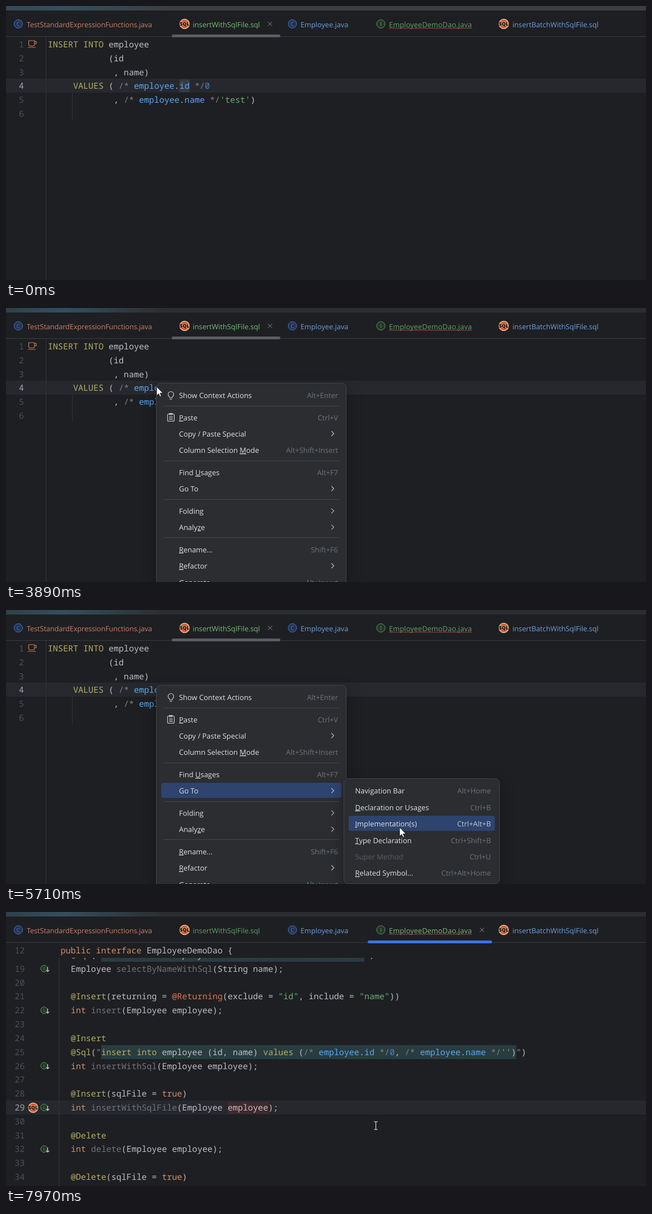
Recreate the animation shown at these times as an HTML page. Size 1143 by 490 pixels, loop 8000 ms.

```html
<!DOCTYPE html>
<html lang="en">
<head>
<meta charset="utf-8">
<title>Go to implementation from SQL</title>
<style>
  html, body { margin: 0; width: 100%; height: 100%; overflow: hidden; background: #1e1f22; }
  svg { display: block; }
  text { white-space: pre; text-rendering: geometricPrecision; }
  .code { font: 15.07px "Noto Sans Mono", "DejaVu Sans Mono", monospace; fill: #bcbec4; }
  .ui { font: 12.92px "Open Sans", "Noto Sans", sans-serif; fill: #dfe1e5; }
  .tab { font-size: 12.75px; }
  .u { text-decoration: underline; }
  .float { filter: drop-shadow(0 10px 13px rgba(0, 0, 0, .3)); }
  .line { fill: none; stroke-linecap: round; stroke-linejoin: round; }
</style>
</head>
<body>
<script>
const LOOP = 8000, CH = 9.04, ROW = 24.83;
const TONE = {
  k: '#b3ae60', c: '#7a7e85', b: '#56a8f5', n: '#4a82c4', s: '#6aab73',
  o: '#cf8e6d', g: '#6f737a', r: '#dc7350'
};

function el(tag, attrs, parent, text) {
  const node = document.createElementNS('http://www.w3.org/2000/svg', tag);
  for (const key in attrs) node.setAttribute(key, attrs[key]);
  if (text !== undefined) node.textContent = text;
  parent.append(node);
  return node;
}
const group = (parent, attrs = {}) => el('g', attrs, parent);
const rect = (parent, x, y, width, height, fill, rx = 0, more = {}) =>
  el('rect', { x, y, width, height, fill, rx, ...more }, parent);
const path = (parent, d, stroke, width = 1, more = {}) =>
  el('path', { d, stroke, 'stroke-width': width, class: 'line', ...more }, parent);
const label = (parent, x, y, text, attrs = {}) =>
  el('text', { x, y, class: 'ui', ...attrs }, parent, text);
const show = (node, on) => node.setAttribute('visibility', on ? 'visible' : 'hidden');

// Code markup: «k word» paints a word in tone k.
function code(parent, x, y, markup) {
  const line = el('text', { x, y: y + 5, class: 'code' }, parent);
  for (const [plain, tone, word] of markup.matchAll(/«(\w) ([^»]*)»|[^«]+/g))
    el('tspan', tone ? { fill: TONE[tone] } : {}, line, tone ? word : plain);
}
function lineNo(parent, x, y, n, current) {
  el('text', { x, y: y + 5, class: 'code', 'text-anchor': 'end',
    style: `fill:${current ? '#a1a3ab' : '#4b5059'}` }, parent, n);
}

function letterIcon(parent, x, y, letter, r = 7.5) {
  const [stroke, fill] = letter === 'C' ? ['#3f78d8', '#25324d'] : ['#57965c', '#253627'];
  el('circle', { cx: x, cy: y, r, fill, stroke }, parent);
  label(parent, x, y + r * .5, letter,
    { 'text-anchor': 'middle', style: `font-size:${r * 1.4}px;fill:${stroke}` });
}
function sqlIcon(parent, x, y) {
  el('circle', { cx: x, cy: y, r: 9.2, fill: '#e3b48c' }, parent);
  el('circle', { cx: x, cy: y, r: 7.4, fill: '#d0593a' }, parent);
  rect(parent, x - 8.5, y - 4, 17, 7.5, '#d98a60', 2);
  label(parent, x, y + 3, 'SQL',
    { 'text-anchor': 'middle', style: 'font-size:8.6px;font-weight:800;fill:#1c1210' });
}
function implIcon(parent, x, y) {
  letterIcon(parent, x - .5, y - .5, 'I', 6);
  path(parent, `M${x + 6} ${y - 3}v8m-2.5 -2.5l2.5 2.5l2.5 -2.5`, '#ced0d6', 1.1);
}
const cross = (parent, x) =>
  path(parent, `M${x - 3.5} 28.5l7 7m0 -7l-7 7`, '#8a8d94');
const chevron = (parent, x, y) =>
  path(parent, `M${x - 2} ${y - 4}l4 4l-4 4`, '#b4b8bf', 1.2);
const panel = (parent, x, y, w, h) =>
  rect(parent, x, y, w, h, '#2b2d30', 8, { stroke: '#43454a', class: 'float' });

const svg = el('svg', { width: 1143, height: 490, viewBox: '0 0 1143 490' }, document.body);
rect(svg, 0, 0, 1143, 490, '#1e1f22');

// Title strip
const strip = rect(svg, 0, 0, 1143, 8, '#3c3f41');
const fade = el('linearGradient', { id: 'teal' }, el('defs', {}, svg));
for (const [offset, opacity] of [[0, .55], [.36, 1], [1, 0]])
  el('stop', { offset, 'stop-color': '#32505e', 'stop-opacity': opacity }, fade);
rect(svg, 0, 0, 285, 8, 'url(#teal)');

// SQL file
const sqlView = group(svg);
const SQL = [
  '«k INSERT INTO» employee',
  '            (id',
  '             , name)',
  '     «k VALUES» ( «c /*» «b employee».«b id» «c */»«n 0»',
  '             , «c /*» «b employee».«b name» «c */»«s \'test\'»)',
  ''
];
rect(sqlView, 0, 130, 1143, 25, '#26282e');
rect(sqlView, 71, 55, 1, 435, '#313438');
rect(sqlView, 118, 155, 1, 49, '#313438');
const idMark = rect(sqlView, 309.5, 131.5, 18.5, 23, '#373b3d');
SQL.forEach((text, i) => {
  const y = 69 + i * ROW;
  code(sqlView, 74.8, y, text);
  lineNo(sqlView, 32, y, i + 1, i === 3);
});
path(sqlView, 'M40.5 62h10.500v6q0 3.500 -3.500 3.500h-3.500q-3.500 0 -3.500 -3.500zM51 63.500h3v4h-3M39.500 74h13',
  '#c4805f', 1.2);
const caret = rect(sqlView, 273, 132.5, 2, 21, '#ced0d6');

// DAO file
const daoView = group(svg);
const DAO = [
  '«k @Sql»("«k select» * «k from» employee «k where» name = «c /*» «b name» «c */»«s \'test\'»")',
  'Employee «g selectByNameWithSql»(String name);',
  '',
  '«k @Insert»(returning = «r @Returning»(exclude = «s "id"», include = «s "name"»))',
  '«o int» «g insert»(Employee employee);',
  '',
  '«k @Insert»',
  '«k @Sql»(«s "»«k insert into» employee (id, name) «k values» («c /*» «b employee».«b id» «c */»«n 0», «c /*» «b employee».«b name» «c */»«s \'\'»)«s "»)',
  '«o int» «g insertWithSql»(Employee employee);',
  '',
  '«k @Insert»(sqlFile = «o true»)',
  '«o int» «g insertWithSqlFile»(Employee employee);',
  '',
  '«k @Delete»',
  '«o int» «g delete»(Employee employee);',
  '',
  '«k @Delete»(sqlFile = «o true»)'
];
const daoY = n => 101.7 + (n - 19) * ROW;
rect(daoView, 0, 337, 1143, 25, '#26282e');
rect(daoView, 94, 82, 1, 408, '#313438');
rect(daoView, 170, 65, 52 * CH, 24, '#293c40');
rect(daoView, 170, 238, 82 * CH, 25, '#293c40');
const paramMark = rect(daoView, 396, 339, 73, 22, '#40292d');
DAO.forEach((text, i) => {
  const n = 18 + i, y = daoY(n);
  code(daoView, 115.7, y, text);
  lineNo(daoView, 33.5, y, n, n === 29);
});
for (const n of [19, 22, 26, 29, 32]) implIcon(daoView, 68.5, daoY(n));
sqlIcon(daoView, 48.5, daoY(29));
rect(daoView, 0, 55, 1143, 27, '#1e1f22');
lineNo(daoView, 33.5, 69, 12);
code(daoView, 97.5, 69, '«o public interface» EmployeeDemoDao {');

// Tabs
rect(svg, 0, 54, 1143, 1, '#393b40');
const TABS = [
  [22, 37, 'C', 'TestStandardExpressionFunctions.java', '#c77d6b', -.1],
  [319, 333.5, 'SQL', 'insertWithSqlFile.sql', '#73bd79', 0],
  [511.5, 526, 'C', 'Employee.java', '#6b9fe2', 0],
  [669.5, 684, 'I', 'EmployeeDemoDao.java', '#62a069', .12],
  [889, 904.5, 'SQL', 'insertBatchWithSqlFile.sql', '#6b9fe2', 0]
];
const tabText = TABS.map(([ix, x, icon, name, fill, gap]) => {
  icon === 'SQL' ? sqlIcon(svg, ix, 32) : letterIcon(svg, ix, 32, icon);
  return label(svg, x, 37.5, name, { class: 'ui tab', style: `fill:${fill};letter-spacing:${gap}px` });
});
path(svg, 'M684 40.500' + 'l2 -1.500l2 1.500'.repeat(37), '#b8524f', .9);
const sqlTab = group(svg), daoTab = group(svg);
cross(sqlTab, 471.5);
const sqlBar = rect(sqlTab, 296, 51, 194, 5, '#5a5d63', 2.5);
cross(daoTab, 850);
rect(daoTab, 646, 51, 222, 5, '#3574f0', 2.5);

// Quick documentation
const doc = group(svg);
panel(doc, 229, 155, 353.5, 85);
code(doc, 251, 182, '«b Employee» employee');
label(doc, 276.5, 218.5, 'doma-tools-test-single-pj.main', { style: 'font-size:13.25px' });
path(doc, 'M260 220h-5.500q-2 0 -2 -2v-9q0 -2 2 -2h4l2.500 2.500h5q2 0 2 2v2', '#ced0d6', 1.1);
rect(doc, 262, 215, 6.5, 6.5, '#25324d', 1.5, { stroke: '#548af7', 'stroke-width': 1.2 });
path(doc, 'M526 219l.8 -3.800l8.500 -8.500q1 -1 2 0l1.200 1.200q1 1 0 2l-8.500 8.500zM533.500 208.500l3.200 3.200', '#ced0d6', 1.1);
for (const cy of [207.5, 213, 218.5]) el('circle', { cx: 562, cy, r: 1.3, fill: '#ced0d6' }, doc);

// Menus: rows are [centre, caption with & before the mnemonic, shortcut or >, disabled]
function makeMenu(box, hot, textX, rightX, rows) {
  const g = group(svg);
  panel(g, ...box);
  const bar = rect(g, hot[0], 0, hot[1] - hot[0], 27, '#2e436e', 4);
  const keys = rows.map(([y, caption, key, off]) => {
    const [head, tail] = caption.split('&');
    const t = label(g, textX, y + 4.5, head, off ? { style: 'fill:#5a5d63' } : {});
    if (tail) {
      el('tspan', { class: 'u' }, t, tail[0]);
      el('tspan', {}, t, tail.slice(1));
    }
    if (key === '>') return chevron(g, 583.5, y - .5);
    return label(g, rightX, y + 4.5, key, { 'text-anchor': 'end', style: 'fill:#6f737a' });
  });
  const hit = (x, y) => x < hot[0] || x > hot[1] ? -1
    : rows.findIndex(r => !r[3] && Math.abs(r[0] - y) < 14);
  const select = i => {
    show(bar, i >= 0 && g.getAttribute('visibility') === 'visible');
    if (i >= 0) bar.setAttribute('y', Math.round(rows[i][0] - 14.5));
    keys.forEach((k, j) => { if (k.tagName === 'text') k.style.fill = i === j ? '#c3cadb' : '#6f737a'; });
  };
  return { g, hit, select };
}
const GO_TO = 5;
const menu = makeMenu([268.5, 134.5, 339, 380], [277, 599], 309, 593, [
  [156, 'Show Context Actions', 'Alt+Enter'],
  [196, '&Paste', 'Ctrl+V'],
  [225, 'Copy / Paste Special', '>'],
  [254.5, 'Column Selection &Mode', 'Alt+Shift+Insert'],
  [294.5, 'Find &Usages', 'Alt+F7'],
  [323.5, 'Go To', '>'],
  [363.3, 'Folding', '>'],
  [392.3, 'Analy&ze', '>'],
  [432, '&Rename...', 'Shift+F6'],
  [461.5, '&Refactor', '>'],
  [491, 'Generate...', 'Alt+Insert']
]);
for (const y of [175, 273, 342, 410]) rect(menu.g, 281, y, 314.5, 1, '#43454a');
path(menu.g, 'M292.500 159.500q-3 -2 -3 -5a5 5 0 0 1 10 0q0 3 -3 5v1.500h-4zM293 163.500h3', '#ced0d6', 1.1);
rect(menu.g, 288.5, 189.5, 12, 13, 'none', 2, { stroke: '#ced0d6', 'stroke-width': 1.1 });
path(menu.g, 'M292 188.500h5v2.500h-5zM291.500 194.500h6m-6 2.500h6m-6 2.500h6', '#ced0d6', 1);
const sub = makeMenu([603.5, 301.5, 278, 188], [612, 873], 623.5, 866, [
  [323.5, 'Navigation Bar', 'Alt+Home'],
  [353, '&Declaration or Usages', 'Ctrl+B'],
  [382.3, '&Implementation(s)', 'Ctrl+Alt+B'],
  [412, '&Type Declaration', 'Ctrl+Shift+B'],
  [441, 'Super Method', 'Ctrl+U', true],
  [470.7, '&Related Symbol...', 'Ctrl+Alt+Home']
]);

// Pointers
const beam = group(svg), arrow = group(svg);
const beamD = 'M-3 -7h2.200l.8 .8l.8 -.8h2.200M0 -6.200v12.400M-3 7h2.200l.8 -.8l.8 .8h2.200';
path(beam, beamD, '#111', 2.4, { opacity: .5 });
path(beam, beamD, '#e8e8e8', 1.1);
path(arrow, 'M0 0V15.500L3.600 12.200L6 17.500L8.400 16.500L6 11.200H11Z', '#111', .8, { style: 'fill:#fff' });
const click = el('circle', { r: 13.5, fill: '#e0d420', opacity: .7 }, svg);

// Moves: start, end, number of steps, from, to, downward bow
const MOVES = [
  [200, 830, 10, [1035, 515], [275.5, 143.5], 0],
  [1030, 1030, 1, 0, [274.5, 142.5], 0],
  [2220, 2220, 1, 0, [270.5, 142.5], 0],
  [3820, 3820, 1, 0, [269, 141], 0],
  [4220, 4690, 7, [269, 141], [406, 321.5], 0],
  [5170, 5710, 9, [406, 321.5], [703, 389], 26],
  [7440, 7440, 1, 0, [704, 388.5], 0],
  [7900, 7970, 2, [704, 388.5], [660.5, 382], 0]
];
const ease = u => 1 - (1 - u ** 1.3) ** 2.5;
function pointerAt(t) {
  const move = MOVES.findLast(m => t >= m[0]);
  if (!move) return null;
  const [t0, t1, n, from, to, bow] = move;
  if (t >= t1) return to;
  const u = (Math.floor((t - t0) / (t1 - t0) * (n - 1) + .02) + 1) / n, e = ease(u);
  return [from[0] + (to[0] - from[0]) * e,
    from[1] + (to[1] - from[1]) * e + bow * Math.sin(Math.PI * u)];
}

function draw(t) {
  const during = (a, b) => t >= a && t < b;
  const dao = t >= 7440, menuOn = during(3820, 7370), subOn = during(4840, 7370);
  const focus = t >= 2290, isArrow = during(3820, 7440);

  strip.setAttribute('fill', focus ? '#2b2d30' : '#3c3f41');
  show(sqlView, !dao);
  show(daoView, dao);
  show(sqlTab, !dao);
  show(daoTab, dao);
  sqlBar.setAttribute('fill', focus && !during(3890, 7370) ? '#3574f0' : '#5a5d63');
  tabText[1].style.fill = dao ? '#5f9f66' : '#73bd79';
  tabText[3].style.fill = dao ? '#73bd79' : '#62a069';
  show(idMark, !focus);
  show(caret, during(2290, 3240) || during(3620, 3820));
  show(paramMark, t >= 7900);
  show(doc, during(3020, 3620));
  show(menu.g, menuOn);
  show(sub.g, subOn);

  const p = pointerAt(t);
  show(beam, p && !isArrow);
  show(arrow, p && isArrow);
  if (p) {
    const at = `translate(${p[0]} ${p[1]})`;
    beam.setAttribute('transform', at);
    arrow.setAttribute('transform', at);
    click.setAttribute('transform', `translate(${p[0] - .5} ${p[1] - .5})`);
  }
  menu.select(menuOn ? (subOn ? GO_TO : menu.hit(...p)) : -1);
  sub.select(subOn ? sub.hit(...p) : -1);
  show(click, during(2220, 2420) || during(3620, 3890) || during(7300, 7440));
}

const start = performance.now();
function tick() {
  draw((performance.now() - start) % LOOP);
  requestAnimationFrame(tick);
}
tick();
</script>
</body>
</html>
```
